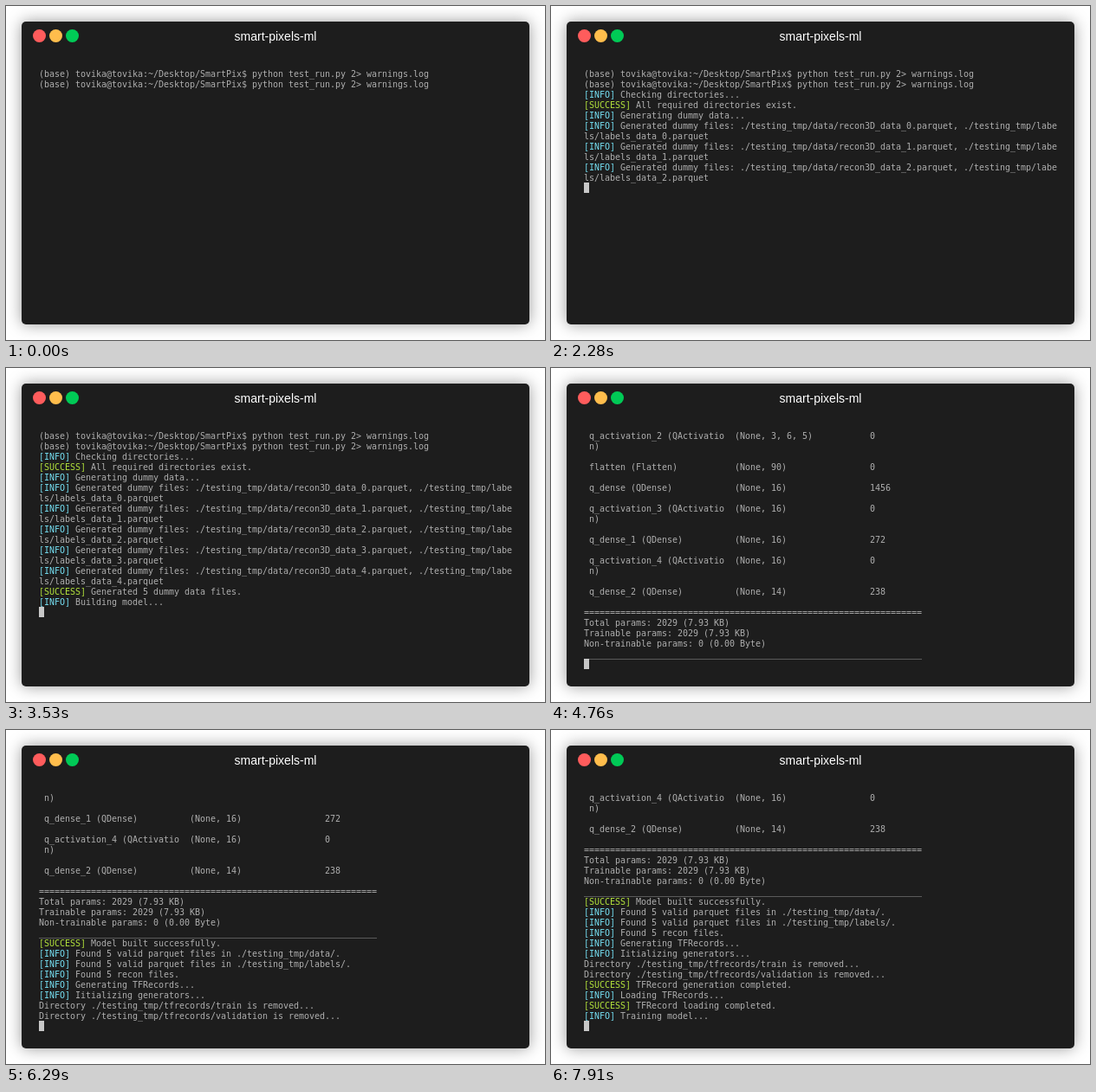
Animation of 622x386 px, one loop 8 s. Source, as an HTML page with a canvas:

```html
<!DOCTYPE html>
<html>
<head>
<meta charset="utf-8">
<style>
  html, body { margin: 0; width: 622px; height: 386px; overflow: hidden; background: #fff; }
  canvas { display: block; }
</style>
</head>
<body>
<canvas id="stage" width="622" height="386"></canvas>
<script>
const ctx = document.getElementById('stage').getContext('2d');
const LOOP = 8000, COLS = 91, ROWS = 22, CELL_W = 6, CELL_H = 12, LEFT = 38, TOP = 72;
const TAGS = { '[INFO]': '#75dff2', '[SUCCESS]': '#b3e33b' };

const info = text => '[INFO] ' + text;
const success = text => '[SUCCESS] ' + text;
const layer = (name, shape, params, wrapped) =>
  [(' ' + name).padEnd(29) + shape.padEnd(26) + params, ...(wrapped ? [' n)'] : []), ''];
const activation = (i, shape) => layer(`q_activation_${i} (QActivatio`, shape, 0, true);
const prompt = '(base) tovika@tovika:~/Desktop/SmartPix$ python test_run.py 2> warnings.log';
const dummyFiles = i =>
  info(`Generated dummy files: ./testing_tmp/data/recon3D_data_${i}.parquet, ./testing_tmp/labels/labels_data_${i}.parquet`);

const log = [
  prompt, prompt,
  info('Checking directories...'),
  success('All required directories exist.'),
  info('Generating dummy data...'),
  ...[0, 1, 2, 3, 4].map(dummyFiles),
  success('Generated 5 dummy data files.'),
  info('Building model...'),
  ...activation(2, '(None, 3, 6, 5)'),
  ...layer('flatten (Flatten)', '(None, 90)', 0),
  ...layer('q_dense (QDense)', '(None, 16)', 1456),
  ...activation(3, '(None, 16)'),
  ...layer('q_dense_1 (QDense)', '(None, 16)', 272),
  ...activation(4, '(None, 16)'),
  ...layer('q_dense_2 (QDense)', '(None, 14)', 238),
  '='.repeat(65),
  'Total params: 2029 (7.93 KB)',
  'Trainable params: 2029 (7.93 KB)',
  'Non-trainable params: 0 (0.00 Byte)',
  '_'.repeat(65),
  success('Model built successfully.'),
  info('Found 5 valid parquet files in ./testing_tmp/data/.'),
  info('Found 5 valid parquet files in ./testing_tmp/labels/.'),
  info('Found 5 recon files.'),
  info('Generating TFRecords...'),
  info('Iitializing generators...'),
  'Directory ./testing_tmp/tfrecords/train is removed...',
  'Directory ./testing_tmp/tfrecords/validation is removed...',
  success('TFRecord generation completed.'),
  info('Loading TFRecords...'),
  success('TFRecord loading completed.'),
  info('Training model...'),
].flatMap(line => line.length > COLS ? [line.slice(0, COLS), line.slice(COLS)] : [line]);

// [start in ms, number of log rows printed]
const steps = [[0, 2], [500, 5], [1140, 7], [1770, 9], [2280, 11], [2930, 13], [3530, 17],
  [4760, 39], [4860, 46], [6290, 47], [7690, 49], [7910, 51]];

function drawWindow() {
  ctx.fillStyle = '#fff';
  ctx.fillRect(0, 0, 622, 386);
  ctx.save();
  ctx.shadowColor = 'rgba(0,0,0,.4)';
  ctx.shadowBlur = 18;
  ctx.fillStyle = '#1d1d1d';
  ctx.beginPath();
  ctx.roundRect(18, 18, 586, 350, 5);
  ctx.fill();
  ctx.restore();
  ['#ff5c5c', '#ffbd4c', '#00ca56'].forEach((color, i) => {
    ctx.fillStyle = color;
    ctx.beginPath();
    ctx.arc(38.5 + 19 * i, 34.5, 7.5, 0, 2 * Math.PI);
    ctx.fill();
  });
  ctx.fillStyle = '#fff';
  ctx.font = '14px "Liberation Sans", Arial, sans-serif';
  ctx.textAlign = 'center';
  ctx.fillText('smart-pixels-ml', 311, 40);
}

function drawRow(text, row) {
  const tag = (text.match(/^\[\w+\]/) || [''])[0];
  [...text].forEach((char, col) => {
    ctx.fillStyle = col < tag.length ? TAGS[tag] : '#afafaf';
    ctx.fillText(char, LEFT + col * CELL_W, TOP + row * CELL_H + 10);
  });
}

function draw(count) {
  drawWindow();
  ctx.font = '10px "DejaVu Sans Mono", monospace';
  ctx.textAlign = 'left';
  const rows = log.slice(Math.max(0, count - ROWS), count);
  rows.forEach(drawRow);
  if (count > 2) {
    ctx.fillStyle = '#c7c7c7';
    ctx.fillRect(LEFT, TOP + rows.length * CELL_H, CELL_W, CELL_H);
  }
}

let shown;
function tick() {
  const t = performance.now() % LOOP;
  const count = steps.findLast(([start]) => start <= t)[1];
  if (count !== shown) draw(shown = count);
  requestAnimationFrame(tick);
}
tick();
</script>
</body>
</html>
```
